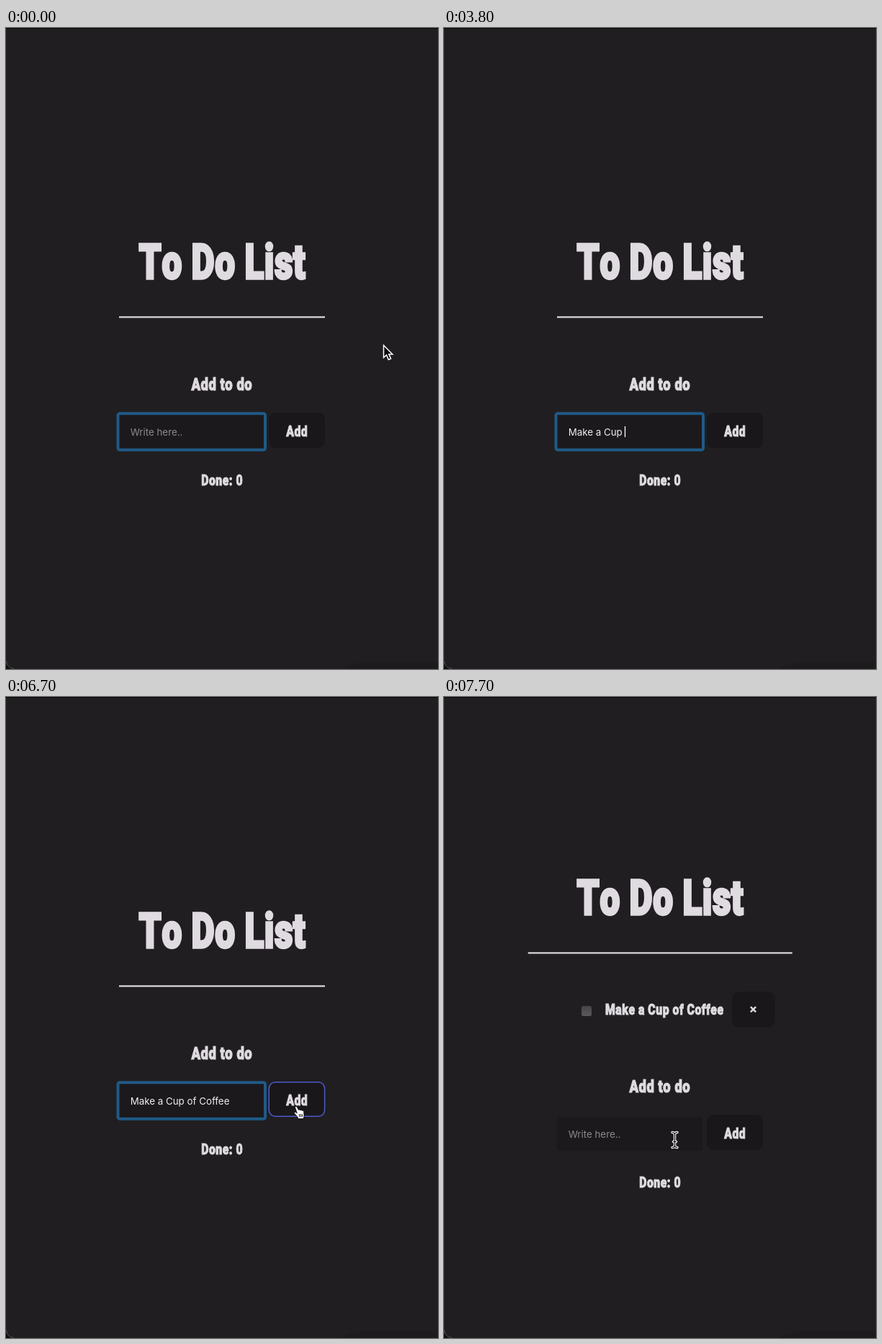
An HTML page that plays this animation: 600 by 890 pixels, repeating every 8000 ms.

```html
<!DOCTYPE html>
<html lang="en">
<head>
<meta charset="utf-8">
<title>To Do List</title>
<style>
  html, body { margin: 0; width: 100%; height: 100%; overflow: hidden; background: #201e20; }
  svg { display: block; width: 100%; height: 100%; }
  .head {
    font-family: Roboto, sans-serif; font-weight: 900; font-kerning: none; letter-spacing: .045em;
    text-anchor: middle; fill: #dfdbe0; stroke: #dfdbe0;
  }
  .field { font: 13.33px Inter, sans-serif; white-space: pre; }
  .cross { font: 900 19px Roboto, sans-serif; text-anchor: middle; fill: #dfdbe0; }
</style>
</head>
<body>
<svg viewBox="0 0 600 890" xmlns="http://www.w3.org/2000/svg">
  <defs>
    <linearGradient id="box" x2="0" y2="1">
      <stop stop-color="#474547"/><stop offset="1" stop-color="#5b595b"/>
    </linearGradient>
  </defs>
  <rect width="600" height="890" fill="#201e20"/>
  <rect width="600" height="1" fill="#080808"/>
  <path d="M465 890Q480 880 510 880H600V890Z" fill="#1d1b1d"/>
  <path d="M0 879Q1 889 11 890H0Z" fill="#0c0c0d"/>
  <path d="M.5 879Q1 889 11 889.5" fill="none" stroke="#555355"/>

  <g id="top">
    <g class="head" data-text="To Do List" data-x="300.5" data-y="348" data-size="66"></g>
    <rect id="rule" y="400.3" height="2.2" fill="#dfdbe0"/>
  </g>

  <g id="item">
    <rect x="191" y="429" width="14" height="14" rx="2.5" fill="url(#box)"/>
    <g class="head" data-text="Make a Cup of Coffee" data-x="306.3" data-y="440.6" data-size="21"></g>
    <rect x="400" y="409" width="60" height="50" rx="10" fill="#19171a"/>
    <text class="cross" x="429.5" y="440.3">×</text>
  </g>

  <g id="form">
    <g class="head" data-text="Add to do" data-x="299.8" data-y="502.7" data-size="24.6"></g>
    <rect x="157" y="537" width="202" height="47" fill="#1b191c"/>
    <rect id="ring" x="155.5" y="535.3" width="204.5" height="50.5" rx="2.5" fill="none" stroke="#1f5a87" stroke-width="4"/>
    <text id="typed" class="field" x="172.7" y="566"></text>
    <rect id="caret" y="553" width="1.3" height="15" fill="#fff"/>
    <rect x="365" y="534" width="78" height="49" rx="9" fill="#19171a"/>
    <rect id="border" x="365.2" y="534.7" width="77.4" height="47.6" rx="9" fill="none" stroke="#4d5bcb" stroke-width="1.5"/>
    <g class="head" data-text="Add" data-x="404.2" data-y="566.5" data-size="21"></g>
    <g class="head" data-text="Done: 0" data-x="300.2" data-y="634.7" data-size="21"></g>
  </g>

  <g id="cursor">
    <path id="arrow" d="M0 0V17L4 13.5L6.8 20L10 18.7L7.2 12.4H12.3Z" fill="#080808" stroke="#fff" stroke-width="1.5"/>
    <g id="hand" transform="translate(-3 -1)">
      <path d="M1.5 2.2Q2 .5 4 1.2L6.3 5.8Q8 4.8 8.8 6.2Q10.5 5.4 11.2 6.8Q13 6.2 13.6 8L14 13Q14 15 13 18H6Q5 15 2.5 12.7Q-.5 10 .5 9Q1.5 8.3 4.2 10.3Z" fill="#fff" stroke="#080808" stroke-width=".8"/>
      <path d="M7.4 11.5v4M9.4 11.5v4M11.4 11.5v4" stroke="#080808" stroke-width=".9"/>
    </g>
    <g id="beam" fill="none" stroke-linecap="round">
      <path class="bar" stroke="#fff" stroke-width="3.4"/>
      <path class="bar" stroke="#080808" stroke-width="1.2"/>
    </g>
  </g>
</svg>
<script>
const LOOP = 8000, STEP = 100, ADDED = 6800, SHIFT = 46;
const CONDENSE = 0.75, HEAVY = 0.05;
const $ = id => document.getElementById(id);
const show = (id, on) => $(id).setAttribute('visibility', on ? 'visible' : 'hidden');

// [time, text in the field]
const typing = [[0, '']];
const type = (text, ...times) => times.forEach((time, i) => {
  const before = typing[typing.length - 1][1];
  typing.push([time, before + text[i]]);
});
type('Make a Cup', 800, 1000, 1100, 1300, 1400, 1800, 1900, 2200, 2400, 2600);
typing.push([3200, 'Make a Cu']);
type('p of Coffee', 3500, 3800, 4200, 4300, 4500, 4700, 4800, 5000, 5500, 5600, 5800);

// [time, x, y] of the pointer's hot spot
const path = [
  [0, 524.5, 440.5], [6000, 505, 462], [6100, 498, 472],
  [6500, 403, 568.5], [6900, 403, 568.5], [7700, 320.5, 614.5]
];

document.querySelectorAll('g.head').forEach(g => {
  const { text, x, y, size } = g.dataset;
  const label = document.createElementNS('http://www.w3.org/2000/svg', 'text');
  label.textContent = text;
  label.setAttribute('font-size', size);
  label.setAttribute('stroke-width', size * HEAVY);
  g.setAttribute('transform', `translate(${x} ${y}) scale(${CONDENSE} 1)`);
  g.append(label);
});
document.querySelectorAll('.bar').forEach(p =>
  p.setAttribute('d', 'M-3.5-10Q0-10 0-7Q0-10 3.5-10M0-7V8M-3.5 11Q0 11 0 8Q0 11 3.5 11M-2 3H2'));

function pointer(t) {
  const next = path.findIndex(p => p[0] > t);
  if (next < 0) return path[path.length - 1].slice(1);
  const [t0, x0, y0] = path[next - 1], [t1, x1, y1] = path[next];
  const k = (t - t0) / (t1 - t0), e = k * k * (3 - 2 * k);
  return [x0 + (x1 - x0) * e, y0 + (y1 - y0) * e];
}

function draw(t) {
  const added = t >= ADDED, dy = added ? SHIFT : 0;
  $('top').setAttribute('transform', `translate(0 ${-dy})`);
  $('form').setAttribute('transform', `translate(0 ${dy})`);
  $('rule').setAttribute('x', added ? 116.7 : 157);
  $('rule').setAttribute('width', added ? 367 : 286);
  show('item', added);
  show('ring', !added);

  const [since, value] = typing.filter(k => k[0] <= t).pop();
  const text = added ? '' : value, field = $('typed');
  field.textContent = text || 'Write here..';
  field.setAttribute('fill', text ? '#f1eff1' : '#8c8a8c');
  $('caret').setAttribute('x', 172 + (text ? field.getComputedTextLength() : 0));
  const caretOn = text ? t < since + 650 : t >= 100 && t < 600;
  show('caret', !added && caretOn);

  const [x, y] = t < 800 ? path[0].slice(1) : pointer(t);
  const inside = (left, right, top, bottom) =>
    x >= left && x <= right && y >= top + dy && y <= bottom + dy;
  // hover stays until the pointer moves after the layout shift
  const hover = inside(365, 443, 534, 583) || (added && t < 7000);
  const overField = inside(157, 359, 537, 584);
  const visible = t < 800 || t >= 6100;
  show('border', visible && hover);
  show('hand', visible && hover);
  show('beam', visible && overField);
  show('arrow', visible && !hover && !overField);
  $('cursor').setAttribute('transform', `translate(${x} ${y})`);
}

const start = performance.now();
function tick() {
  const t = (performance.now() - start) % LOOP;
  draw(Math.floor(t / STEP) * STEP);
  requestAnimationFrame(tick);
}
tick();
</script>
</body>
</html>
```
